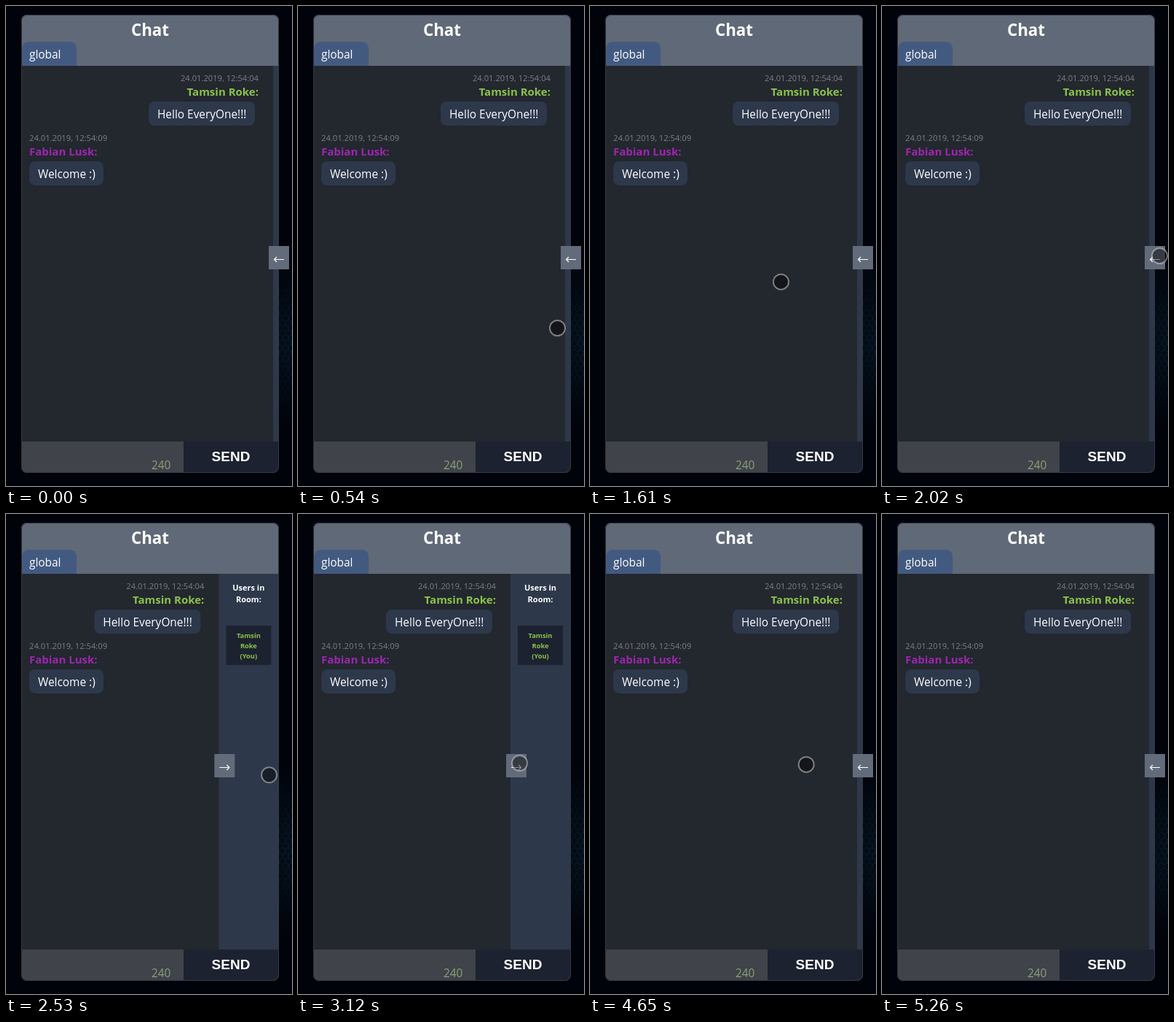
Recreate the animation shown at these times as an HTML page. Size 393 px wide and 658 px high, loop 5.77 s.

```html
<!DOCTYPE html>
<html lang="en">
<head>
<meta charset="utf-8">
<title>Chat</title>
<style>
  html, body { margin: 0; height: 100%; overflow: hidden; background: #01030a; }
  svg { display: block; width: 393px; height: 658px; font-family: "Open Sans", "Noto Sans", sans-serif; fill: #fff; }
  .title { font-size: 22.3px; font-weight: 700; }
  .text { font-size: 15.4px; }
  .time { font-size: 11.2px; fill: #7e8085; }
  .name { font-size: 15px; font-weight: 700; }
  .head { font-size: 11px; font-weight: 700; }
  .user { font-size: 9.3px; font-weight: 700; }
  .send { font: 700 19px "Liberation Sans", Arial, sans-serif; }
  .green { fill: #8bc34a; }
  .purple { fill: #9c27b0; }
  .bubble { fill: #2d384b; }
  .mid { text-anchor: middle; }
  .end { text-anchor: end; }
</style>
</head>
<body>
<svg viewBox="0 0 393 658">
  <defs>
    <pattern id="hex" width="8" height="13.8" patternUnits="userSpaceOnUse">
      <path d="M4 0V2.3L0 4.6V9.2L4 11.5V13.8M4 2.3L8 4.6V9.2L4 11.5" fill="none" stroke="#12303f" stroke-width=".8"/>
    </pattern>
    <radialGradient id="glow">
      <stop offset="0" stop-color="#fff" stop-opacity=".7"/>
      <stop offset="1" stop-color="#fff" stop-opacity="0"/>
    </radialGradient>
    <radialGradient id="haze">
      <stop offset="0" stop-color="#030e1a"/>
      <stop offset="1" stop-color="#030e1a" stop-opacity="0"/>
    </radialGradient>
    <mask id="fade"><ellipse cx="392" cy="460" rx="50" ry="105" fill="url(#glow)"/></mask>
    <clipPath id="card"><rect x="21" y="12" width="354" height="628" rx="8"/></clipPath>
  </defs>

  <rect width="393" height="658" fill="#01030a"/>
  <ellipse cx="392" cy="460" rx="50" ry="120" fill="url(#haze)"/>
  <rect x="360" y="340" width="33" height="240" fill="url(#hex)" mask="url(#fade)"/>

  <g clip-path="url(#card)">
    <rect x="21" y="12" width="354" height="628" fill="#23272e"/>
    <rect x="21" y="12" width="354" height="70" fill="#606977"/>
    <path d="M22 82V59Q22 49 32 49H87Q97 49 97 59V82Z" fill="#435a80"/>
    <text class="title mid" x="198" y="41">Chat</text>
    <text class="text" x="32" y="72">global</text>

    <text class="time" x="32" y="185">24.01.2019, 12:54:09</text>
    <text class="name purple" x="32" y="205">Fabian Lusk:</text>
    <rect class="bubble" x="32" y="213" width="102" height="33" rx="8"/>
    <text class="text" x="44" y="236">Welcome :)</text>

    <g class="slide">
      <text class="time end" x="347" y="103">24.01.2019, 12:54:04</text>
      <text class="name green end" x="347" y="123">Tamsin Roke:</text>
      <rect class="bubble" x="196" y="131" width="146" height="33" rx="8"/>
      <text class="text" x="208" y="154">Hello EveryOne!!!</text>

      <rect x="367" y="82" width="90" height="515" fill="#2d384a"/>
      <text class="head mid" x="408" y="105">Users in</text>
      <text class="head mid" x="408" y="121">Room:</text>
      <rect x="377" y="153" width="62" height="54" fill="#1c2230"/>
      <g class="user green mid">
        <text x="408" y="170">Tamsin</text>
        <text x="408" y="184">Roke</text>
        <text x="408" y="198">(You)</text>
      </g>
    </g>

    <rect x="21" y="597" width="223" height="43" fill="#404349"/>
    <rect x="244" y="597" width="131" height="43" fill="#1c2230"/>
    <text class="text" x="200" y="635" style="fill: #8aa07a">240</text>
    <text class="send mid" x="309" y="624">SEND</text>
  </g>
  <rect x="21.5" y="12.5" width="353" height="627" rx="8" fill="none" stroke="#383d45"/>

  <g class="slide">
    <rect x="361" y="329" width="28" height="32" fill="#626b7a"/>
    <path id="arrow" d="M382 347.5H368.5M372 344L368.5 347.5L372 351" fill="none" stroke="#fff" stroke-width="1.2"/>
  </g>
  <circle id="cursor" stroke-width="2"/>
</svg>
<script>
const LOOP = 5770, SHOW = 160, HIDE = 5260, OPEN = 2320, CLOSE = 3980;

// Pointer strokes, each a quadratic curve that starts where the last one ended
const origin = [326, 639];
const strokes = [
  { from: 160, to: 540, bend: [352, 540], end: [356.5, 441.5] },
  { from: 590, to: 770, bend: [348, 418], end: [325, 416] },
  { from: 770, to: 1230, bend: [265, 525], end: [229, 447] },
  { from: 1280, to: 2020, bend: [235, 350], end: [381.5, 342.5] },
  { from: 2350, to: 3120, bend: [338, 385], end: [304.5, 341.5] },
  { from: 4600, to: 5210, bend: [255, 340], end: [339.5, 646.5] }
];
const clicks = [1230, 2300, 3960];

const slides = document.querySelectorAll(".slide");
const arrow = document.getElementById("arrow");
const cursor = document.getElementById("cursor");

const set = (el, attrs) => Object.entries(attrs).forEach(([k, v]) => el.setAttribute(k, v));
const progress = (t, from, to) => Math.min(1, Math.max(0, (t - from) / (to - from)));
const smooth = p => p * p * (3 - 2 * p);

function pointAt(t) {
  let pos = origin;
  for (const { from, to, bend, end } of strokes) {
    const p = progress(t, from, to), q = 1 - p;
    pos = pos.map((a, i) => q * q * a + 2 * p * q * bend[i] + p * p * end[i]);
    if (p < 1) break;
  }
  return pos;
}

function draw(t) {
  const open = smooth(progress(t, OPEN, OPEN + 220)) - smooth(progress(t, CLOSE, CLOSE + 220));
  for (const s of slides) set(s, { transform: `translate(${-75 * open})` });
  const flipped = t >= OPEN && t < CLOSE;
  set(arrow, { transform: flipped ? "translate(750) scale(-1 1)" : "" });

  const [x, y] = pointAt(t);
  const down = clicks.some(c => Math.abs(t - c) <= 50);
  set(cursor, {
    cx: x, cy: y, r: down ? 11 : 10.5,
    visibility: t >= SHOW && t < HIDE ? "visible" : "hidden",
    fill: down ? "rgba(150,145,0,.8)" : "rgba(0,0,0,.45)",
    stroke: down ? "#b0b034" : "rgba(210,210,210,.53)"
  });
}

const start = performance.now();
function tick() {
  draw((performance.now() - start) % LOOP);
  requestAnimationFrame(tick);
}
tick();
</script>
</body>
</html>
```
